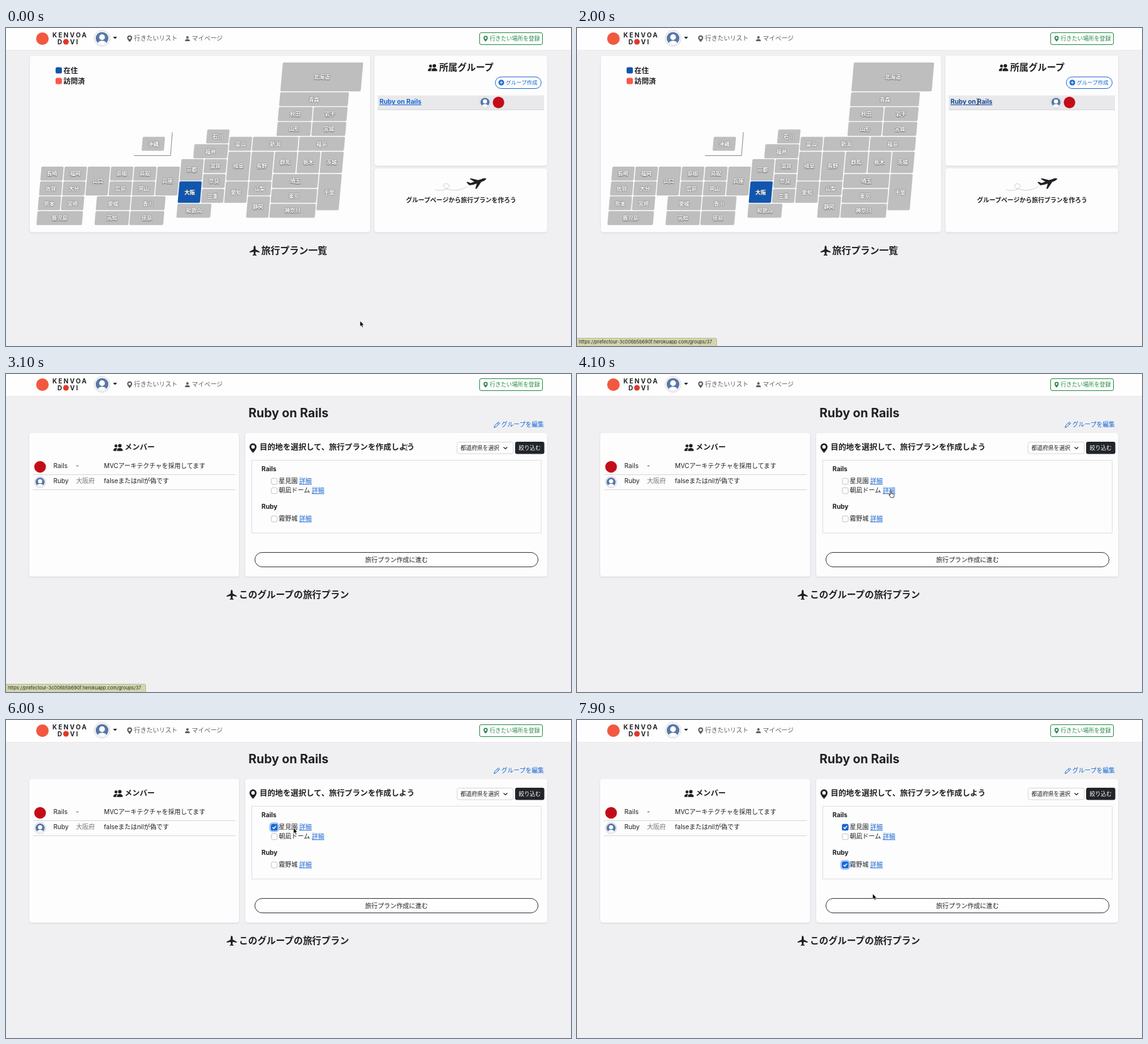
Write an HTML page that moves like this. It is 900x507 px and loops after 8000 ms.

```html
<!DOCTYPE html>
<html lang="ja">
<head>
<meta charset="utf-8">
<title>旅行プラン</title>
<style>
html, body { margin: 0; width: 100%; height: 100%; overflow: hidden; background: #f0f0f2; }
svg { display: block; width: 100%; height: 100%; }
text { font-family: Inter, "Noto Sans CJK JP", "Noto Sans CJK", sans-serif; white-space: pre; }
.b { font-weight: 700; }
.m { text-anchor: middle; }
.u { text-decoration: underline; }
.label { text-shadow: 0 0 2px #666, 0 .5px 1px #666; }
.panel { fill: #fdfdfd; filter: drop-shadow(0 1px 1px #d4d4da); }
</style>
</head>
<body>
<svg id="stage" viewBox="0 0 900 507" xmlns="http://www.w3.org/2000/svg"></svg>
<script>
const INK = '#1f2024', GREY = '#75757a', NAV = '#5c5c60', LINE = '#d6d6da', PAPER = '#fefefe';
const BLUE = '#1767d2', HOME = '#1156ae', GREEN = '#258a45', RED = '#c40c18';
const ICONS = {
  pin: 'M8 16s6-5.7 6-10A6 6 0 0 0 2 6c0 4.3 6 10 6 10m0-7a3 3 0 1 1 0-6 3 3 0 0 1 0 6',
  person: 'M3 14s-1 0-1-1 1-4 6-4 6 3 6 4-1 1-1 1zm5-6a3 3 0 1 0 0-6 3 3 0 0 0 0 6',
  people: 'M7 14s-1 0-1-1 1-4 5-4 5 3 5 4-1 1-1 1zm4-6a3 3 0 1 0 0-6 3 3 0 0 0 0 6m-5.8 6A2.2 2.2 0 0 1 5 13c0-1.4.7-2.8 1.9-3.7A6.3 6.3 0 0 0 5 9c-4 0-5 3-5 4s1 1 1 1zM4.5 8a2.5 2.5 0 1 0 0-5 2.5 2.5 0 0 0 0 5',
  plane: 'M8 0C7 0 6.4 2 6.4 3.2V6L0 9.6V11l6.4-1.2.3 3.7L5 14.9V16l3-.6 3 .6v-1.1l-1.7-1.4.3-3.7L16 11V9.6L9.6 6V3.2C9.6 2 9 0 8 0z'
};

const text = (x, y, size, str, fill = INK, cls = '') =>
  `<text x="${x}" y="${y}" font-size="${size}" fill="${fill}" class="${cls}">${str}</text>`;
const rect = (x, y, w, h, r, fill, stroke = 'none', extra = '') =>
  `<rect x="${x}" y="${y}" width="${w}" height="${h}" rx="${r}" fill="${fill}" stroke="${stroke}" ${extra}/>`;
const dot = (x, y, r, fill) => `<circle cx="${x}" cy="${y}" r="${r}" fill="${fill}"/>`;
const path = (d, stroke, width = 1, extra = '') =>
  `<path d="${d}" fill="none" stroke="${stroke}" stroke-width="${width}" ${extra}/>`;
const panel = (x, y, w, h) => rect(x, y, w, h, 4, PAPER, 'none', 'class="panel"');
const icon = (name, cx, cy, size, fill = INK) =>
  `<path d="${ICONS[name]}" fill="${fill}" transform="translate(${cx - size / 2} ${cy - size / 2}) scale(${size / 16})"/>`;
const group = (id, body) => `<g id="${id}">${body}</g>`;

// Round portrait placeholder: head and shoulders
function avatar(x, y, r) {
  const k = r / 12;
  return `<g transform="translate(${x} ${y}) scale(${k})">` +
    `<circle r="12" fill="#fcfcfc" stroke="#d0d0d6" stroke-width="${1 / k}"/>` + dot(0, 0, 9.7, '#5877a8') +
    dot(0, -1.8, 4.4, PAPER) + `<path d="M-6.5 7.2C-5 2.5 5 2.5 6.5 7.2Q0 12.5-6.5 7.2" fill="${PAPER}"/></g>`;
}

function header() {
  return rect(0, 0, 900, 35, 0, PAPER) + path('M0 35.5H900', '#e8e8ec') +
    dot(58, 17, 10, '#f2583f') +
    `<g letter-spacing="2.3">${text(74, 15, 10, 'KENVOA', INK, 'b')}${text(82, 26, 10, 'D', INK, 'b')}${text(102, 26, 10, 'VI', INK, 'b')}</g>` +
    dot(95.5, 22, 4.5, '#e0382c') +
    avatar(153, 16.5, 12.5) + `<path d="M170.5 14h6.5l-3.25 3.5z" fill="${INK}"/>` +
    icon('pin', 197, 17, 10.5, NAV) + text(204, 20.3, 9.9, '行きたいリスト', NAV) +
    icon('person', 289, 17, 10.5, NAV) + text(296, 20.3, 9.9, 'マイページ', NAV) +
    rect(754.5, 7.5, 100, 19, 2.5, PAPER, GREEN) +
    icon('pin', 764, 17, 9, GREEN) + text(770.5, 20.2, 8.9, '行きたい場所を登録', GREEN);
}

// Stacks of prefectures on a half-cell grid; a digit gives the height (default 2)
const STACKS = [
  [0, 0, 7, '北海道4'], [0, 4, 6, '青森'], [0, 6, 3, '秋田 山形'], [3, 6, 3, '岩手 宮城'],
  [-4, 10, 2, '富山 岐阜4 愛知3'], [-2, 10, 4, '新潟'], [2, 10, 4, '福島'],
  [-2, 12, 2, '長野4 山梨 静岡3'], [0, 12, 2, '群馬3'], [2, 12, 2, '栃木3'], [4, 12, 2, '茨城3 千葉5'],
  [0, 15, 4, '埼玉 東京 神奈川'], [-6, 9, 2, '石川'], [-7, 11, 3, '福井'], [-8, 13, 2, '京都3 大阪3'],
  [-8, 19, 3, '和歌山'], [-6, 13, 2, '滋賀 奈良 三重'], [-10, 14, 2, '兵庫4'], [-12, 14, 2, '鳥取 岡山'],
  [-12, 18, 3, '香川 徳島'], [-15, 18, 3, '愛媛 高知'], [-14, 14, 2, '島根 広島'], [-16, 14, 2, '山口4'],
  [-18, 14, 2, '福岡 大分 宮崎'], [-20, 14, 2, '長崎 佐賀 熊本'], [-20, 20, 4, '鹿児島'], [-11.5, 10, 2, '沖縄']
];

function map() {
  const cw = 18.5, ch = 11.85, slope = Math.tan(Math.PI / 36);
  let tiles = '', labels = '';
  for (const [col, row, w, names] of STACKS) {
    let k = row;
    for (const item of names.split(' ')) {
      const name = item.replace(/\d/, ''), h = +item.slice(name.length) || 2;
      tiles += rect(col * cw, k * ch, w * cw - 1.5, h * ch - 1.4, 1.8, name === '大阪' ? HOME : '#bebebe');
      const y = (k + h / 2) * ch - 0.7;
      labels += text(441 + (col + w / 2) * cw - 0.75 - y * slope, 55 + y + 3.1, 8.3, name, '#fff', 'b m label');
      k += h;
    }
  }
  return `<g transform="translate(441 55) skewX(-5)">${tiles}</g>` + labels +
    path('M265 166L262 203.5H204', '#8a8a8a');
}

function home() {
  return panel(38, 44.5, 542, 281) + panel(587, 44, 275, 175.5) + panel(587, 224, 275, 101.5) +
    rect(79, 62.5, 10, 10, 2.5, HOME) + text(91.5, 72, 11.4, '在住', INK, 'b') +
    rect(79, 79.5, 10, 10, 2.5, '#ff5548') + text(91.5, 89, 11.4, '訪問済', INK, 'b') +
    map() +
    icon('people', 679.5, 63, 15) + text(690, 68, 14.6, '所属グループ', INK, 'b') +
    rect(779.5, 78, 73, 18.5, 9.25, PAPER, BLUE) + dot(789, 87, 4.5, BLUE) +
    path('M786.5 87h5M789 84.5v5', '#fff') + text(796, 90.2, 8.5, 'グループ作成', BLUE) +
    rect(592, 107.5, 265, 22.5, 0, '#e9e9ec') + path('M592 130.5H857', LINE) +
    group('link', text(595, 121, 10.2, 'Ruby on Rails', 'currentColor', 'b u')) +
    avatar(763, 118.5, 9) + dot(784.5, 118.7, 9.2, RED) +
    path('M684 258C692 261 706 257 706 252C706 247 696 247 697 252C698 258 722 263 735 252', '#bcbcbc', 1, 'stroke-dasharray="2 1"') +
    `<path d="M765 240.5Q763 238.5 757 241L752 242.5 741 239.8 738.5 240.6 746 245 740 247.3 735.5 245.3 733.5 246 738 250.8Q745 250 750 248L747.5 256.5 750 256 757 245.5Q765 242.5 765 240.5Z" fill="${INK}"/>` +
    text(725, 278.3, 9.8, 'グループページから旅行プランを作ろう', INK, 'b m') +
    icon('plane', 396, 355, 16) + text(406.5, 360, 15, '旅行プラン一覧', INK, 'b');
}

function spot(id, y, name, linkX) {
  return rect(422.5, y - 8, 9.5, 9.5, 2.5, PAPER, '#c4c4ca') +
    group(id, rect(420.7, y - 9.8, 13, 13, 3.5, 'none', '#9cc4f8', 'class="ring" stroke-width="2.5"') +
      rect(422, y - 8.5, 10.5, 10.5, 2.5, BLUE) + path(`M424.5 ${y - 3.2}l2 2 3.7-4`, '#fff', 1.5)) +
    text(434.5, y, 10, name) + text(linkX, y, 10, '詳細', BLUE, 'u');
}

function trip() {
  return text(450, 69, 19.5, 'Ruby on Rails', INK, 'b m') +
    path('M777.5 85.5l1-3.5 6-5.5 2 2-6 5.5zM782.5 78l2 2', BLUE) + text(789, 84.3, 9.75, 'グループを編集', BLUE) +
    panel(37, 94, 334, 229) + panel(381, 94, 481, 229) +
    icon('people', 178.5, 117, 15) + text(189, 121.3, 12, 'メンバー', INK, 'b') +
    dot(54.3, 148, 9.3, RED) + text(75.5, 150, 10.2, 'Rails') + text(111.5, 150, 10, '-') +
    text(156, 150, 10, 'MVCアーキテクチャを採用してます') + path('M43 160.5H366M43 184.5H366', LINE) +
    avatar(54.3, 172.3, 9) + text(75.5, 174.3, 10.2, 'Ruby') + text(111.5, 174.3, 10, '大阪府', GREY) +
    text(156, 174.3, 10, 'falseまたはnilが偽です') +
    icon('pin', 393.5, 118, 15) + text(404, 121, 12.4, '目的地を選択して、旅行プランを作成しよう', INK, 'b') +
    rect(718.5, 108.5, 89.5, 18.5, 3, PAPER, LINE) + text(724, 121.2, 8.85, '都道府県を選択') +
    path('M792.5 116.5l3 3 3-3', INK, 1.2) +
    rect(811, 108, 46.5, 19.5, 3, '#212429') + text(834.3, 121.2, 8.8, '絞り込む', '#fff', 'm') +
    rect(391.5, 137.5, 461, 116, 0, 'none', '#dedee2') +
    text(407, 155, 10.2, 'Rails', INK, 'b') + text(407, 215, 10.2, 'Ruby', INK, 'b') +
    spot('check1', 174.3, '星見園', 467) + spot('check2', 189.3, '朝凪ドーム', 487) + spot('check3', 234.3, '霧野城', 467) +
    rect(396.5, 284.5, 451, 23, 11.5, PAPER, '#33343a') + text(622, 299.5, 10, '旅行プラン作成に進む', INK, 'm') +
    icon('plane', 359.5, 352, 16) + text(371, 357, 14.7, 'このグループの旅行プラン', INK, 'b');
}

const status = () => '<path d="M0 494.5H220Q222.5 494.5 222.5 497V507H0Z" fill="#d2d6ae"/>' +
  path('M0 494.5H220Q222.5 494.5 222.5 497V507', '#b8bc98') +
  text(3, 503.3, 7.4, 'https://prefectour-3c006b5b690f.herokuapp.com/groups/37', '#2a2a24');

const cursors = () =>
  group('arrow', '<path d="M0 0V9L2 7.2 3.5 10.3 5 9.6 3.6 6.6H6.3Z" fill="#000" stroke="#fff" stroke-width=".6"/>') +
  group('beam', path('M-2-4.5Q0-4.5 0-3Q0-4.5 2-4.5M0-3V4M-2 5Q0 5 0 3.5Q0 5 2 5', '#444', 0.8)) +
  group('hand', '<path d="M0 0Q1-1 1.7 0V3.5L5.5 4.5Q6.5 5 6.2 7L5.5 10H1L-2 6Q-2.3 4.7-1 5L0 6Z" fill="#fff" stroke="#111" stroke-width=".8"/>');

const stage = document.getElementById('stage');
stage.innerHTML = header() + group('home', home()) + group('trip', trip()) +
  group('status', status()) + group('cursor', cursors());

const $ = id => document.getElementById(id);
const show = (el, on) => { el.style.display = on ? '' : 'none'; };

// time, x, y of the pointer
const ROUTE = [
  [0, 564, 467], [300, 564, 467], [1480, 638, 117], [3300, 638, 117], [4100, 499, 187], [4300, 499, 187],
  [5000, 458, 172], [6100, 458, 172], [6700, 456, 231], [7300, 456, 231], [7900, 471, 277], [8000, 471, 277]
];

function pointer(t) {
  const i = ROUTE.findIndex(p => p[0] > t), [t0, x0, y0] = ROUTE[i - 1], [t1, x1, y1] = ROUTE[i];
  const u = (t - t0) / (t1 - t0), e = u * u * (3 - 2 * u);
  return [x0 + (x1 - x0) * e, y0 + (y1 - y0) * e];
}

function draw(t) {
  const onTrip = t >= 3100, second = t >= 6900;
  show($('home'), !onTrip);
  show($('trip'), onTrip);
  show($('status'), t >= 1500 && t < 3400);
  $('link').style.color = t >= 1400 ? '#174a94' : BLUE;

  show($('check1'), t >= 5500);
  show($('check2'), false);
  show($('check3'), second);
  show($('check1').querySelector('.ring'), !second);

  const [x, y] = pointer(t);
  const kind = t >= 1400 && t < 3400 ? 'beam' : t >= 4000 && t < 4600 ? 'hand' : 'arrow';
  for (const id of ['arrow', 'beam', 'hand']) show($(id), id === kind);
  $('cursor').setAttribute('transform', `translate(${x.toFixed(2)} ${y.toFixed(2)})`);
}

const STEP = 100, LOOP = 8000, start = performance.now();
function tick(now) {
  const t = Math.max(0, now - start) % LOOP;
  draw(Math.floor(t / STEP) * STEP);
  requestAnimationFrame(tick);
}
draw(0);
requestAnimationFrame(tick);
</script>
</body>
</html>
```
